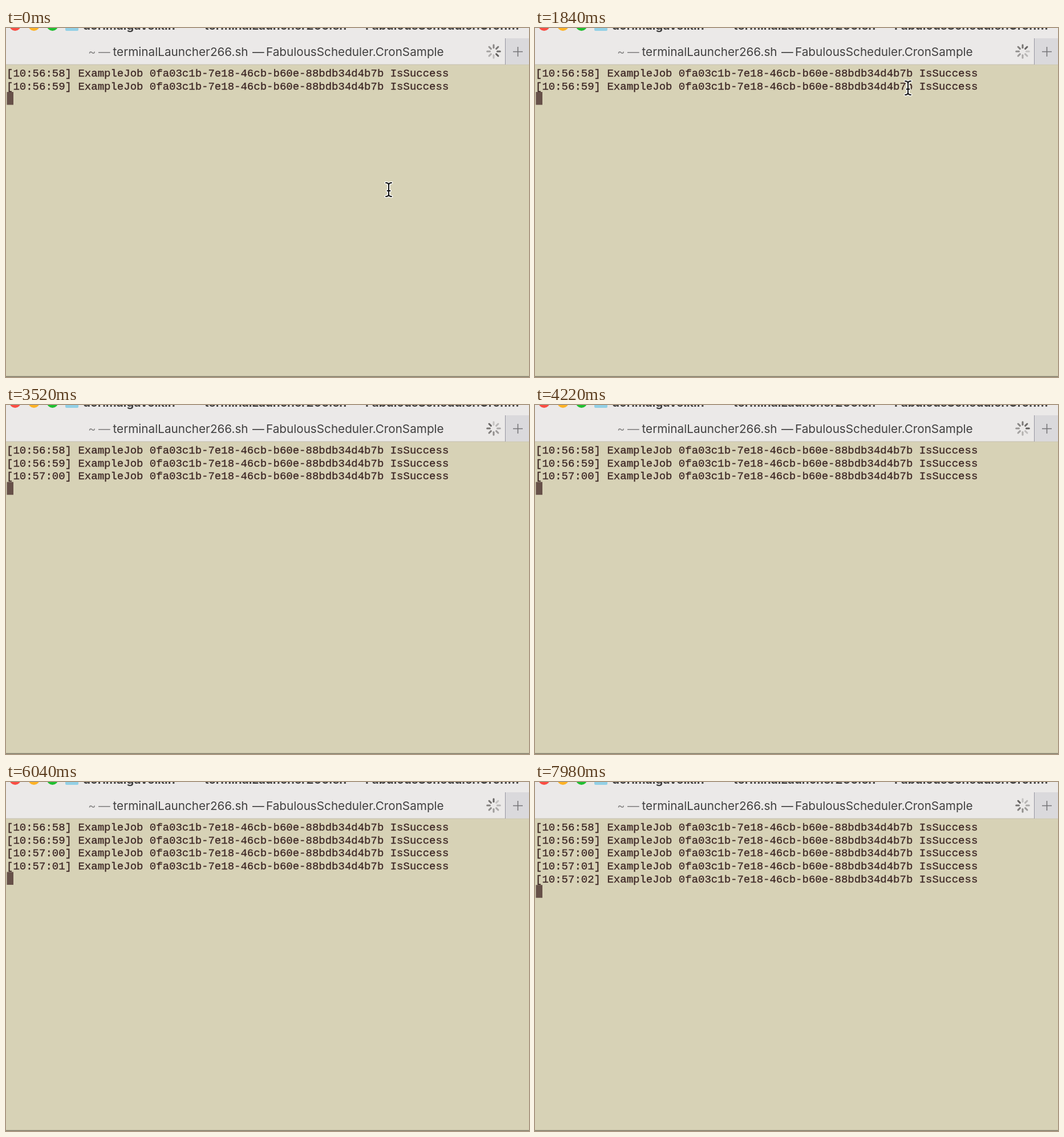
Write an HTML page that moves like this. It is 917x611 px and loops after 8 s.

```html
<!DOCTYPE html>
<html lang="en">
<head>
<meta charset="utf-8">
<title>Terminal</title>
<style>
html, body { margin: 0; width: 100%; height: 100%; overflow: hidden; background: #d7d2b6; }
svg { display: block; width: 100%; height: 100%; }
text { white-space: pre; }
.bar { font: 20.7px Inter, sans-serif; fill: #414040; }
.bold { font-weight: 700; }
.dim { fill: #868585; }
.log { font: 19px "Liberation Mono", monospace; fill: #3f2927; stroke: #3f2927; stroke-width: .35px; }
</style>
</head>
<body>
<svg viewBox="0 0 917 611" preserveAspectRatio="none">
  <rect width="917" height="611" fill="#d7d2b6"/>
  <rect width="917" height="64" fill="#ebe9e8"/>
  <rect y="63.5" width="917" height="1" fill="#c5c2b4"/>
  <rect x="875" y="18" width="42" height="45.5" fill="#dad9dc"/>
  <path d="M875.5 18V64" stroke="#9796a2"/>
  <path d="M889 41.5H906M897.5 33V50" stroke="#757477" stroke-width="1.6"/>
  <circle cx="16" cy="-5" r="10" fill="#fa4d43"/>
  <circle cx="49" cy="-5" r="10" fill="#fdb225"/>
  <circle cx="81.5" cy="-5" r="10" fill="#20bf30"/>
  <rect x="104" y="-14" width="23" height="19" rx="2" fill="#92d0e6"/>
  <g class="bar bold">
    <text x="135" y="2.5">dorimalgavelkin</text>
    <text x="322" y="2.5">—</text>
    <text x="348" y="2.5">terminalLauncher266.sh</text>
    <text x="606" y="2.5">—</text>
    <text x="630" y="2.5">FabulousScheduler.Cron…</text>
  </g>
  <g class="bar">
    <text x="144" y="48.5" class="dim">~</text>
    <text x="162" y="48.5" class="dim">—</text>
    <text x="187.5" y="48.5">terminalLauncher266.sh</text>
    <text x="432" y="48.5">—</text>
    <text x="456" y="48.5">FabulousScheduler.CronSample</text>
  </g>
  <g id="spinner" transform="translate(855 41)" stroke="#3d3a38" stroke-width="3" stroke-linecap="round"></g>
  <g id="log" class="log"></g>
  <rect id="caret" x="1.5" width="11.5" height="22.5" fill="#675149"/>
  <g id="mouse" fill="none" stroke-linecap="round" stroke-linejoin="round">
    <path id="beam" d="M-5 -12Q0 -12 0 -8Q0 -12 5 -12M0 -8V8M-5 12Q0 12 0 8Q0 12 5 12M-2.5 2H2.5" stroke="#fff" stroke-width="4.6"/>
    <use href="#beam"/>
    <path d="M-5 -12Q0 -12 0 -8Q0 -12 5 -12M0 -8V8M-5 12Q0 12 0 8Q0 12 5 12M-2.5 2H2.5" stroke="#111" stroke-width="2"/>
  </g>
  <rect y="609.5" width="917" height="1.5" fill="#817c6b"/>
</svg>
<script>
const LOOP = 8000, TURN = 2240, LINE = 22.75;
const JOB = "ExampleJob 0fa03c1b-7e18-46cb-b60e-88bdb34d4b7b IsSuccess";
const STAMPS = ["10:56:58", "10:56:59", "10:57:00", "10:57:01", "10:57:02"];
const FIRST = 1900, EVERY = 2800;

const byId = id => document.getElementById(id);
const caret = byId("caret"), mouse = byId("mouse");

function add(parent, tag, attrs, text) {
  const el = document.createElementNS("http://www.w3.org/2000/svg", tag);
  for (const key in attrs) el.setAttribute(key, attrs[key]);
  if (text) el.textContent = text;
  parent.appendChild(el);
  return el;
}

const rows = STAMPS.map((stamp, i) =>
  add(byId("log"), "text", { x: 1, y: 84.8 + i * LINE }, `[${stamp}] ${JOB}`));
const spokes = Array.from({ length: 8 }, (_, i) =>
  add(byId("spinner"), "path", { d: "M6.5 0H11.3", transform: `rotate(${i * 45})` }));

// Eased progress between two times
function ease(t, from, to) {
  const p = Math.min(1, Math.max(0, (t - from) / (to - from)));
  return p * p * (3 - 2 * p);
}

function draw(t) {
  const count = t < FIRST ? 2 : 3 + Math.floor((t - FIRST) / EVERY);
  rows.forEach((row, i) => row.setAttribute("visibility", i < count ? "visible" : "hidden"));
  caret.setAttribute("y", 66.5 + count * LINE);

  const head = 60 + 360 * t / TURN;
  spokes.forEach((spoke, i) => {
    const behind = ((head - i * 45) % 360 + 360) % 360 / 360;
    spoke.setAttribute("opacity", 0.82 - 0.62 * behind);
  });

  const move = ease(t, 60, 860), leave = ease(t, 1660, 2000);
  const y = 283 - 115 * move - 115 * leave;
  mouse.setAttribute("transform", `translate(${671 - 17 * move} ${y})`);
  mouse.setAttribute("visibility", y > 64 ? "visible" : "hidden");
}

const start = performance.now();
function tick() {
  draw((performance.now() - start) % LOOP);
  requestAnimationFrame(tick);
}
draw(0);
requestAnimationFrame(tick);
</script>
</body>
</html>
```
